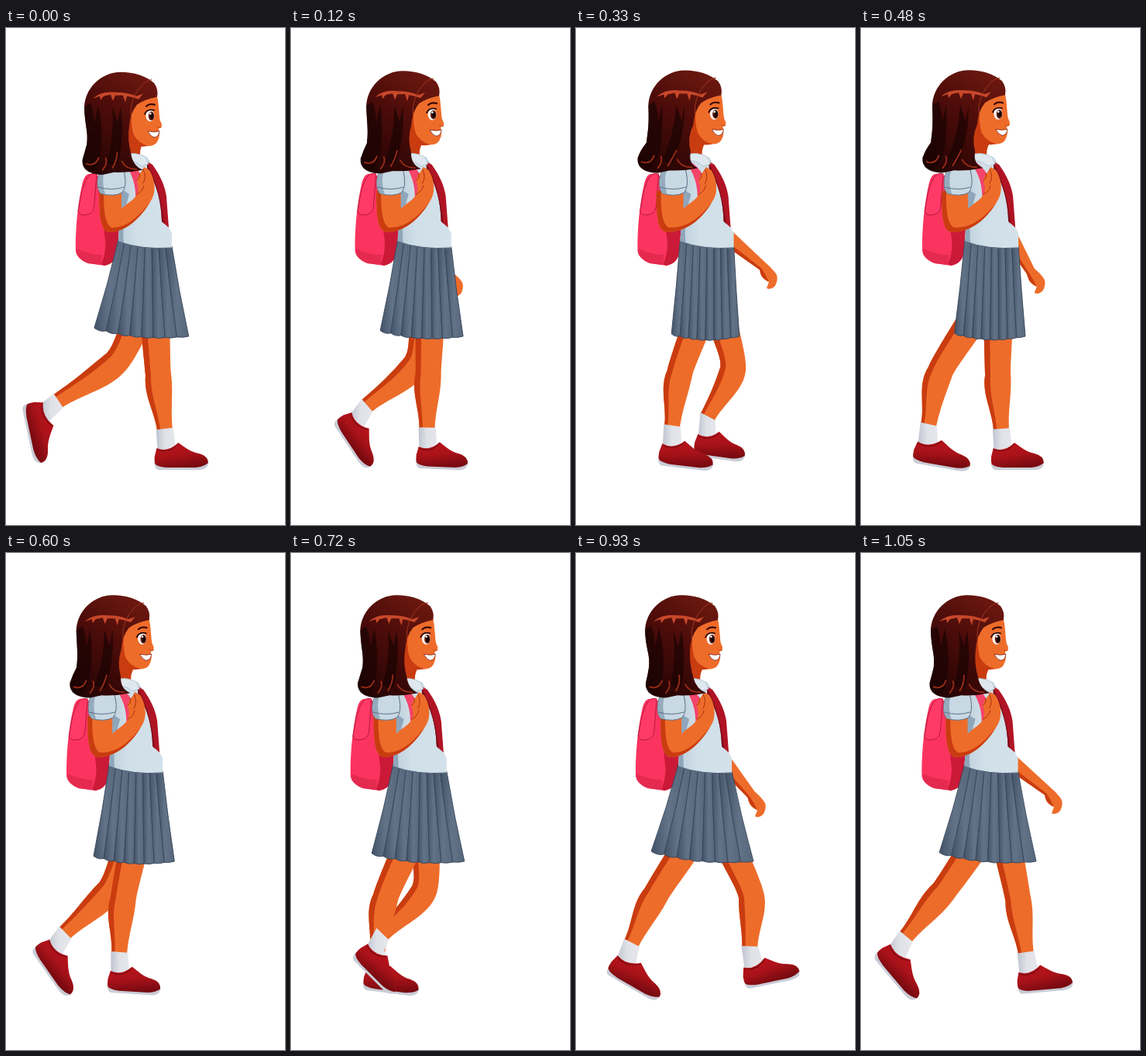
Write an HTML page that moves like this. It is 360 px wide and 640 px high and loops after 1.08 s.

```html
<!DOCTYPE html>
<html lang="en">
<head>
<meta charset="utf-8">
<title>Walking schoolgirl</title>
<style>
html, body { margin: 0; width: 100%; height: 100%; overflow: hidden; background: #fff; }
svg { display: block; width: 100vw; height: 100vh; }
.skin { fill: #ee6c2a; }
.shade { fill: #c93c10; }
.line { fill: none; stroke-linecap: round; stroke-linejoin: round; }
</style>
</head>
<body>
<svg viewBox="0 0 360 640">
  <defs>
    <linearGradient id="pleatFill">
      <stop offset="0" stop-color="#435266"/><stop offset=".5" stop-color="#627388"/><stop offset="1" stop-color="#56667b"/>
    </linearGradient>
    <linearGradient id="hairFill" x1=".75" y1="0" x2=".2" y2="1">
      <stop offset="0" stop-color="#6b180f"/><stop offset=".4" stop-color="#4f0d0a"/><stop offset="1" stop-color="#240404"/>
    </linearGradient>
    <linearGradient id="shirtFill">
      <stop offset="0" stop-color="#b9cbd8"/><stop offset=".4" stop-color="#d0dfe8"/><stop offset="1" stop-color="#d3e1ea"/>
    </linearGradient>
    <linearGradient id="shoeFill" x2=".3" y2="1">
      <stop offset="0" stop-color="#bd141c"/><stop offset=".55" stop-color="#a91219"/><stop offset="1" stop-color="#780a10"/>
    </linearGradient>
    <linearGradient id="sockFill">
      <stop offset="0" stop-color="#bfc4d0"/><stop offset=".45" stop-color="#e0e2e8"/><stop offset="1" stop-color="#e6e7ec"/>
    </linearGradient>
    <g id="shoe">
      <path fill="url(#shoeFill)" d="M-14 1Q2 7 17 -6C27 0 34 6 47 8Q60 11 60 20Q58 28 46 28H-12Q-18 25 -17 12Z"/>
      <path fill="#c9ccd6" d="M-16.500 21Q-14 25 0 26H42Q54 25 60 20Q60 29 46 29H-11Q-17 28 -16.500 21Z"/>
      <path class="line" stroke="#6f0910" d="M-13 3Q3 9 17 -4"/>
    </g>
  </defs>

  <g id="farArm"><path class="skin"/><path class="shade"/></g>
  <g id="legs"></g>

  <g class="torso">
    <path fill="#fb345f" d="M101 188C91 186 89 194 87 203C82 224 78 262 79 288Q80 297 95 303L116 306Q127 304 131 294L140 200Z"/>
    <path fill="#ca1a38" d="M113 212L140 205L132 293Q128 304 116 306L112 304Q120 285 116 266Z"/>
    <path fill="#e52a50" d="M80 284Q97 292 113 292L112 305L95 303Q79 297 80 284Z"/>
    <path fill="#ff3a66" stroke="#b8183f" d="M106 188C95 184 90 199 86 214L82 236Q84 243 95 240Q103 238 103 226Z"/>
  </g>
  <g id="skirt"></g>

  <g class="torso">
    <path class="shade" d="M143 140L166 148Q160 158 163 168L143 170Z"/>
    <path fill="url(#shirtFill)" d="M142 165L171 166L187 190L194 215L198 255L203 264V283Q165 286 134 275Q136 245 134 210L128 174Z"/>
    <path fill="#8fa6ba" d="M134 205L148 214Q138 245 141 277L134 275Q136 245 134 205Z"/>
    <path class="line" stroke="#52647a" d="M134 275Q165 286 202 283"/>
    <path fill="#b01424" d="M171 172L178 176C188 190 194 203 196 217L199 257L190 249Q189 210 172 181Z"/>
    <path fill="#7d0c18" d="M171 174Q188 205 193 252L190 249Q189 210 171 181Z"/>
    <path fill="#dfe8ef" stroke="#a9b9c8" stroke-width=".7" d="M139 164Q155 158 169 166L173 175L164 178Q154 169 139 171Z"/>
    <path fill="#f54469" d="M139 171L147 172Q163 183 166 198L163 224H156Q158 192 139 171Z"/>
    <path id="arm" class="skin"/>
    <path id="armShade" class="shade"/>
    <path class="line" stroke="#a8300f" d="M158 196Q163 193 161 187M166 182Q171 192 166 200M158 214Q165 211 167 203"/>
    <path fill="#c9d9e4" stroke="#5d7086" d="M124 172C109 178 105 194 108 208L111 213Q127 218 139 212Q145 204 142 188Q140 174 130 171Z"/>
    <path fill="#94abbd" d="M122 174C109 180 106 195 109 208L111 213L117 214C112 197 114 183 122 174Z"/>
    <path class="line" stroke="#5d7086" d="M108 205Q125 210 141 205"/>
  </g>

  <g id="head">
    <path class="skin" d="M143 75H180Q185 85 186 100L187 112Q187 117 190 122Q190 126 186 127L187 135Q187 140 184 145Q180 151 171 150L143 148Z"/>
    <path class="shade" d="M143 112L151 108Q150 126 154 136Q160 147 173 150L166 151L143 150Z"/>
    <path fill="#d6541b" d="M183 123Q186 128 190 124Q190 128 185 127Z"/>
    <path fill="#fff" stroke="#7b1c12" stroke-width=".8" d="M172 131Q181 133 187 131Q186 139 180 139Q175 138 172 131Z"/>
    <ellipse cx="175" cy="111" rx="5.500" ry="7.500" fill="#fff"/>
    <ellipse cx="176.500" cy="111.500" rx="3.800" ry="5.800" fill="#612117"/>
    <ellipse cx="177" cy="111.500" rx="2.200" ry="4" fill="#160506"/>
    <circle cx="175.300" cy="108.500" r="1.300" fill="#fff"/>
    <path class="line" stroke="#260606" stroke-width="1.800" d="M168 109Q171 102 180 104"/>
    <path class="line" stroke="#3b0907" stroke-width="2.200" d="M170 99Q174 95 181 97"/>
    <path id="hair" fill="url(#hairFill)"/>
    <path id="hairDark" fill="#1b0304" opacity=".7"/>
    <path id="strands" class="line" stroke="#9a2d18" stroke-width="1.800"/>
    <path fill="#c8482a" d="M101 89Q112 79 130 81Q146 81 157 86L166 83L160 90Q152 87 145 86L143 94L140 85L130 85L127 92L124 84L115 86L111 91L110 86Q104 88 101 89Z"/>
    <path class="line" stroke="#a13420" d="M150 112Q148 88 166 70Q174 64 177 65"/>
  </g>
</svg>
<script>
const LOOP = 1080, STEP = 30, PLEATS = 8;
const HIP_Y = 290, HEM_Y = 397, KNEE_Y = 446, ANKLE_Y = 518;
const NS = "http://www.w3.org/2000/svg";
const $ = id => document.getElementById(id);

// Ankle turning points: time, x, lift above the ground, foot angle
const nearStride = [
  [0, 205, 0, 0], [480, 87, 6, 10], [600, 75, 28, 55], [720, 117, 26, 45],
  [810, 189, 8, 6], [960, 233, 10, -16], [1050, 213, 2, -5]
];
const farStride = [
  [0, 66, 37, 78], [210, 120, 26, 40], [405, 200, 10, -12],
  [480, 181, 0, 0], [810, 85, 6, 10], [1050, 57, 23, 50]
];

function sample(keys, t) {
  const next = keys.findIndex(k => k[0] > t);
  if (next < 0) return keys[keys.length - 1].slice(1);
  const a = keys[next - 1], b = keys[next], u = (t - a[0]) / (b[0] - a[0]);
  return a.slice(1).map((v, i) => v + (b[i + 1] - v) * u);
}

function add(parent, tag, attrs) {
  const node = document.createElementNS(NS, tag);
  for (const k in attrs) node.setAttribute(k, attrs[k]);
  parent.append(node);
  return node;
}
const setPath = (node, d) => node.setAttribute("d", d);
const plus = (p, d, k) => [p[0] + d[0] * k, p[1] + d[1] * k];
const unit = (x, y) => { const l = Math.hypot(x, y); return [x / l, y / l]; };
const toward = (p, q) => unit(q[0] - p[0], q[1] - p[1]);
const normal = d => [d[1], -d[0]];
const pt = p => p.map(v => v.toFixed(2)).join(" ");

function makeLeg() {
  const skin = add($("legs"), "g"), foot = add($("legs"), "g");
  return {
    skin, foot,
    lit: add(skin, "path", { class: "skin" }),
    shade: add(skin, "path", { class: "shade" }),
    sock: add(foot, "path", { fill: "url(#sockFill)" }),
    shoe: add(foot, "use", { href: "#shoe" })
  };
}

function poseLeg(leg, hipX, [ankleX, lift, angle]) {
  // A lifted foot pushes the knee forward; a trailing one straightens it.
  const A = [ankleX, ANKLE_Y - lift], reach = ankleX - hipX;
  const kneeY = KNEE_Y - lift * .45;
  const straightX = hipX + reach * (kneeY - HIP_Y) / (A[1] - HIP_Y);
  const K = [straightX + 2.1 * lift + .28 * Math.min(0, reach), kneeY];
  const H = [hipX + .62 * (K[0] - hipX) + 4, HEM_Y];
  const d1 = toward(H, K), d2 = toward(K, A), dk = unit(d1[0] + d2[0], d1[1] + d2[1]);
  const top = plus(H, d1, -22), shin = Math.hypot(A[0] - K[0], A[1] - K[1]) * .36;

  // s runs from -1 at the back edge to 1 at the front edge
  const edge = s => {
    const h = plus(top, normal(d1), 18.5 * s), k = plus(K, normal(dk), 16.5 * s), a = plus(A, normal(d2), 10 * s);
    const calf = plus(plus(k, dk, shin), normal(d2), s < 0 ? 5 * s : s);
    return [h, plus(h, d1, 25), plus(k, dk, -14), k, calf, plus(a, d2, -shin), a].map(pt);
  };
  const between = (s, r) => {
    const e = edge(s), f = edge(r).reverse();
    return `M${e[0]}C${e.slice(1, 4)}C${e.slice(4)}L${f[0]}C${f.slice(1, 4)}C${f.slice(4)}Z`;
  };
  setPath(leg.lit, between(-1, 1));
  setPath(leg.shade, between(-1, -.58));

  const rad = angle * Math.PI / 180, dir = [Math.cos(rad), Math.sin(rad)];
  const bend = .6 * rad, length = .86 + .0014 * Math.abs(reach);
  const F = [A[0] + 2 - 22 * Math.sin(bend), A[1] + 22 * Math.cos(bend)];
  const mouth = plus(F, [-dir[1], dir[0]], 4), cuff = plus(A, d2, -2), n = normal(d2);
  setPath(leg.sock, "M" + [plus(cuff, n, -11), plus(cuff, n, 11),
    plus(mouth, dir, 14 * length), plus(mouth, dir, -13 * length)].map(pt).join("L") + "Z");
  leg.shoe.setAttribute("transform", `translate(${pt(F)}) rotate(${angle}) scale(${length} 1)`);
}

function poseFarArm(x, y, dx) {
  const S = [191 + dx, 266], wrist = [x - 8, y - 13], d = toward(S, wrist), n = normal(d);
  const [lit, shade] = $("farArm").children;
  const front = plus(wrist, n, 6), back = plus(wrist, n, -6);
  setPath(lit, `M${pt(plus(S, n, 10))}L${pt(front)}Q${x + 5} ${y - 10} ${x + 10} ${y - 2}Q${x + 12} ${y + 5} ${x + 8} ${y + 12}`
    + `Q${x + 2} ${y + 18} ${x - 3} ${y + 15}L${x} ${y + 7}Q${x - 10} ${y + 3} ${x - 11} ${y - 4}L${pt(back)}L${pt(plus(S, n, -11))}Z`);
  setPath(shade, `M${pt(plus(S, n, -11))}L${pt(back)}L${x - 11} ${y - 4}Q${x - 8} ${y + 3} ${x} ${y + 7}Q${x - 4} ${y - 2} ${pt(plus(wrist, n, -3))}L${pt(plus(S, n, -5))}Z`);
}

const pleats = Array.from({ length: PLEATS }, () =>
  add($("skirt"), "path", { fill: "url(#pleatFill)", stroke: "#35435a", "stroke-width": .9 }));

function poseSkirt(dx, left, leftY, right) {
  const waist = u => [134 + dx + 69 * u, 272 + 9 * u];
  const hem = u => [left + (right - left) * u, leftY + (HEM_Y - leftY) * u + 6 * Math.sin(Math.PI * u)];
  const bow = (w, h) => [w[0] + (h[0] - w[0]) * .42, (w[1] + h[1]) / 2];
  pleats.forEach((node, i) => {
    const a = i / PLEATS, b = (i + 1) / PLEATS;
    const [wa, wb, ha, hb] = [waist(a), waist(b), hem(a), hem(b)];
    setPath(node, `M${pt(wa)}L${pt(wb)}Q${pt(bow(wb, hb))} ${pt(hb)}`
      + `Q${pt([(ha[0] + hb[0]) / 2, hb[1] + 2])} ${pt(ha)}Q${pt(bow(wa, ha))} ${pt(wa)}Z`);
  });
}

function poseHair(s) {
  const h = s * .5;
  setPath($("hair"), `M137 55C112 55 90 76 90 102C91 125 ${97 + h} 132 ${95 + h} 148Q${94 + s} 158 ${91 + s} 168`
    + `Q${90 + s} 177 ${97 + s} 182Q${106 + s} 188 ${118 + s} 187L${132 + s} 184Q${150 + s} 185 ${169 + s} 181`
    + `Q${156 + s} 176 ${152 + h} 160Q${147 + h} 142 148 125Q149 108 158 97Q168 90 184 87Q186 77 180 69Q163 55 137 55Z`);
  setPath($("hairDark"), `M90 100C91 125 ${97 + h} 132 ${95 + h} 148L${91 + s} 168Q${91 + s} 178 ${100 + s} 184`
    + `Q${112 + s} 183 ${113 + h} 155Q${116 + h} 125 108 98L103 122Q102 105 98 95Z`
    + `M126 100Q${131 + h} 135 ${123 + s} 172L${136 + s} 175Q${144 + h} 140 137 100L133 120Z`);
  setPath($("strands"), `M${96 + s} 173Q${108 + s} 177 ${112 + s} 165M${117 + s} 181Q${124 + s} 172 ${121 + s} 166`
    + `M${130 + s} 178Q${136 + s} 168 ${134 + h} 158M${142 + s} 170Q${147 + s} 180 ${161 + s} 180`);
}

function poseArm(e) {
  const outer = `M${111 + e} 210C${111 + e} 235 ${111 + e} 263 ${125 + e} 263C145 262 163 244 175 224`;
  setPath($("arm"), outer + `C184 212 181 194 174 183L167 179`
    + `C165 185 158 189 158 198Q162 208 157 216C151 224 143 227 138 233L138 210Z`);
  setPath($("armShade"), outer + `C160 244 143 258 ${127 + e} 257Q${116 + e} 252 ${117 + e} 210Z`);
}

const near = makeLeg(), far = makeLeg();

function draw(t) {
  const turn = 2 * Math.PI / LOOP;
  const entry = Math.exp(-t / 110);
  const lean = Math.max(0, -Math.sin(turn * t));
  const sway = (1 + Math.sin(turn * (t - 100))) / 2;
  const armSwing = Math.cos(2 * Math.PI * (t - 330) / 720);
  const dx = 11 * entry - 2.5 * lean;

  document.querySelectorAll(".torso").forEach(g => g.setAttribute("transform", `translate(${dx} 0)`));
  $("head").setAttribute("transform", `translate(${11 * Math.exp(-t / 280) - 1.7 * lean} ${2.5 * entry - .7})`);
  poseHair(-15 * sway);
  poseArm(-8 * sway);
  poseSkirt(dx, 97 + 26 * sway + 11 * entry, 384 + 10 * sway, 229 - 19 * sway + 11 * entry);
  poseFarArm(219 + 30 * armSwing, 328 - 8 * armSwing, dx);
  poseLeg(near, 167 + dx, sample(nearStride, t));
  poseLeg(far, 167 + dx, sample(farStride, t));
  // The swinging leg passes behind the standing one.
  $("legs").append(...(t < LOOP / 2
    ? [far.skin, far.foot, near.skin, near.foot]
    : [near.skin, far.skin, far.foot, near.foot]));
}

const start = performance.now();
function tick() {
  const t = Math.max(0, performance.now() - start) % LOOP;
  draw(Math.floor(t / STEP) * STEP);
  requestAnimationFrame(tick);
}
tick();
</script>
</body>
</html>
```
